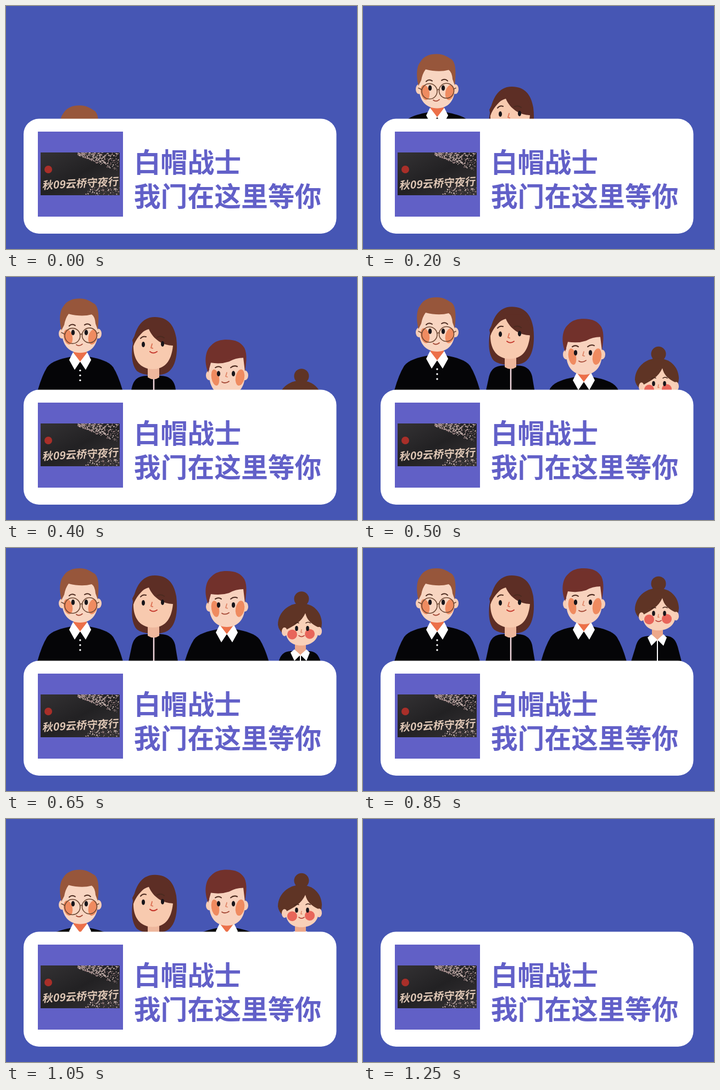
An HTML page that plays this animation: 639x443 px, repeating every 1500 ms.

```html
<!DOCTYPE html>
<html lang="zh-CN">
<head>
<meta charset="utf-8">
<title>白帽战士</title>
<style>
  html, body { margin: 0; width: 100%; height: 100%; overflow: hidden; background: #4656b4; }
  svg { display: block; width: 639px; height: 443px; }
  text { font-family: "Noto Sans CJK SC", "Noto Sans CJK", sans-serif; font-weight: 700; }
  .slogan { font-size: 48.8px; fill: #6260c8; }
  .line { fill: none; stroke-linecap: round; stroke-linejoin: round; }
</style>
</head>
<body>
<svg viewBox="0 0 639 443">
  <defs>
    <clipPath id="above"><rect width="639" height="206"/></clipPath>
    <clipPath id="pic"><rect x="63" y="267" width="144" height="78"/></clipPath>
    <linearGradient id="slate" x2="1" y2="1">
      <stop stop-color="#343234"/><stop offset=".5" stop-color="#222123"/><stop offset="1" stop-color="#373436"/>
    </linearGradient>
    <g id="suit">
      <path d="M119 143C100 147 83 151 75 162Q65 178 57 207V240H213V207Q205 178 195 162C187 151 170 147 151 143Z" fill="#050507"/>
      <path d="M123 128H147V145L135 153L123 145Z" fill="#ec7049"/>
      <path d="M122 135L115 149L125 167L135 152ZM148 135L155 149L145 167L135 152Z" fill="#fff"/>
    </g>
  </defs>

  <rect width="639" height="443" fill="#4656b4"/>

  <g clip-path="url(#above)">
    <g class="person">
      <use href="#suit"/>
      <g fill="#fff"><circle cx="135" cy="168" r="1.7"/><circle cx="135" cy="177" r="1.7"/><circle cx="135" cy="186" r="1.7"/></g>
      <g fill="#f7cdb6"><ellipse cx="102" cy="101" rx="6" ry="9"/><ellipse cx="168" cy="101" rx="6" ry="9"/></g>
      <path d="M102 58H167V100C167 122 155 136 135 136C114 136 102 121 102 98Z" fill="#f8d5c1"/>
      <g fill="#ef8b60"><ellipse cx="113" cy="107" rx="8" ry="14" transform="rotate(-12 113 107)"/><ellipse cx="158" cy="107" rx="8" ry="14" transform="rotate(12 158 107)"/></g>
      <path d="M101 95C96 75 98 59 104 52C110 41 121 37 134 37C148 37 154 43 160 46C169 51 170 70 167 94L163 83Q162 70 156 66Q138 71 114 65Q108 73 106 85Z" fill="#97563b"/>
      <g class="line" stroke="#4c2b20" stroke-width="2"><path d="M115 87Q120 82 126 86"/><path d="M143 85Q149 81 154 86"/></g>
      <g fill="#17151a"><ellipse cx="122" cy="99" rx="3.2" ry="5"/><ellipse cx="146" cy="99" rx="3.2" ry="5"/></g>
      <g class="line" stroke="#6e4935" stroke-width="1.6">
        <circle cx="121" cy="105" r="14"/><circle cx="152" cy="104" r="13.5"/>
        <path d="M135 103Q137 100 139 103M107 102L101 99M165 101L169 99"/>
      </g>
      <path class="line" d="M128 121Q133 125 139 120" stroke="#a44835" stroke-width="1.8"/>
    </g>

    <g class="person">
      <path d="M259 157C242 157 233 162 229 179L223 207V240H313V207L308 177C304 162 295 157 278 157Z" fill="#050507"/>
      <path d="M271 50C249 50 238 67 233 88C227 112 228 137 238 148C249 158 286 160 298 148C310 137 313 113 310 88C306 64 294 50 271 50Z" fill="#5d2e25"/>
      <path d="M258 140H279V160Q269 167 258 160Z" fill="#eeb79d"/>
      <path d="M260 72C245 77 232 88 232 101C231 126 243 145 267 145C288 145 301 132 304 102C286 102 268 91 260 72Z" fill="#f8caaf"/>
      <path d="M263 66C249 76 237 88 232 103L230 92L244 65ZM258 64C265 82 283 96 306 103L309 90L292 64Z" fill="#5d2e25"/>
      <g class="line" stroke="#4c2b20" stroke-width="2"><path d="M245 89Q249 84 255 86"/><path d="M275 87Q282 83 288 88"/></g>
      <g fill="#17151a"><ellipse cx="250" cy="100" rx="3" ry="5"/><ellipse cx="285" cy="99" rx="3" ry="5"/></g>
      <path class="line" d="M266 99L264 106L267 107" stroke="#de7659" stroke-width="2"/>
      <path class="line" d="M262 113Q268 118 275 113" stroke="#c5392e" stroke-width="2"/>
      <path d="M269 163V210" stroke="#f4d9df" stroke-width="2.5"/>
    </g>

    <g class="person">
      <use href="#suit" x="267"/>
      <g fill="#f7cdb6"><ellipse cx="370" cy="102" rx="6" ry="9"/><ellipse cx="435" cy="102" rx="6" ry="9"/></g>
      <path d="M370 64H435V101C435 125 422 139 402 139C382 139 370 124 370 101Z" fill="#f8d2be"/>
      <g fill="#ef8b60"><ellipse cx="381" cy="106" rx="7" ry="15" transform="rotate(-10 381 106)"/><ellipse cx="426" cy="106" rx="8" ry="15" transform="rotate(10 426 106)"/></g>
      <path d="M368 97C360 76 363 57 373 48C381 39 391 37 402 37C418 37 428 42 434 52C440 64 437 82 435 95L432 70Q418 70 406 77Q391 82 373 79Z" fill="#72312b"/>
      <g class="line" stroke="#4c2b20" stroke-width="2"><path d="M381 88Q387 84 392 88"/><path d="M409 88Q415 83 421 86"/></g>
      <g fill="#17151a"><ellipse cx="387" cy="99" rx="3.1" ry="5"/><ellipse cx="414" cy="99" rx="3.1" ry="5"/></g>
      <path class="line" d="M402 97L400 104L403 105" stroke="#df8668" stroke-width="1.8"/>
      <path class="line" d="M393 114Q399 118 406 113" stroke="#a44835" stroke-width="1.8"/>
    </g>

    <g class="person">
      <path d="M522 160C506 160 500 166 496 181L488 207V240H580V207L573 180C569 167 564 160 549 160Z" fill="#050507"/>
      <circle cx="538" cy="65" r="13.5" fill="#5f3425"/>
      <path d="M536 73C512 73 495 92 495 112Q496 122 506 130H567Q575 122 575 109C574 88 559 73 536 73Z" fill="#5f3425"/>
      <g fill="#f7cdb6"><ellipse cx="507" cy="125" rx="5" ry="8"/><ellipse cx="570" cy="124" rx="5" ry="8"/></g>
      <path d="M526 143H546V163L536 170L526 163Z" fill="#eda88a"/>
      <path d="M545 91C538 107 524 114 509 122V124C510 141 521 150 537 150C556 150 568 140 569 124V117C556 111 548 104 545 91Z" fill="#f9d0b8"/>
      <g fill="#e8655a"><circle cx="521" cy="130" r="9"/><circle cx="553" cy="129" r="9"/></g>
      <g class="line" stroke="#4c2b20" stroke-width="1.6"><path d="M525 110Q529 107 533 109"/><path d="M546 109Q550 106 554 109"/></g>
      <g fill="#17151a"><ellipse cx="529" cy="119" rx="2.8" ry="4.6"/><ellipse cx="549" cy="119" rx="2.8" ry="4.6"/></g>
      <path class="line" d="M538 121L537 126L539 126" stroke="#df8668" stroke-width="1.6"/>
      <path class="line" d="M533 132Q538 136 543 132" stroke="#b8443a" stroke-width="1.7"/>
      <path d="M525 157L518 163L525 178L536 167ZM547 157L553 163L547 178L536 167Z" fill="#fff"/>
      <path d="M536 168V210" stroke="#fff" stroke-width="2"/>
    </g>
  </g>

  <rect x="32" y="205.5" width="569.5" height="209.5" rx="28" fill="#fff"/>
  <rect x="58" y="229" width="155" height="155" fill="#6160c6"/>
  <g clip-path="url(#pic)">
    <rect x="63" y="267" width="144" height="78" fill="url(#slate)"/>
    <g id="dust"></g>
    <circle cx="77" cy="298" r="7" fill="#a92f29"/>
    <text transform="translate(66 334) rotate(-3) skewX(-10)" font-size="19.3" fill="#e0c8b6">秋09云桥守夜行</text>
  </g>
  <text class="slogan" x="232.8" y="302.8">白帽战士</text>
  <text class="slogan" x="232.8" y="364.5">我门在这里等你</text>
</svg>
<script>
  const LOOP = 1500, STEP = 50;
  const people = [...document.querySelectorAll(".person")];
  // drop: hidden depth; rise and fall: [start, duration]
  const moves = [
    { drop: 172, rise: [-52, 505], fall: [850, 380] },
    { drop: 160, rise: [70, 504], fall: [850, 380] },
    { drop: 172, rise: [205, 525], fall: [850, 380] },
    { drop: 157, rise: [305, 560], fall: [865, 365] }
  ];

  const part = (t, [start, length]) => Math.min(1, Math.max(0, (t - start) / length)) * Math.PI / 2;

  function offset(t, { drop, rise, fall }) {
    const up = 1 - Math.sin(part(t, rise));
    const down = 1 - Math.cos(part(t, fall));
    return drop * (up + down);
  }

  function scatterDust() {
    let seed = 11;
    const random = () => (seed = seed * 16807 % 2147483647) / 2147483647;
    const tones = ["#c9b2ae", "#a58c8b", "#e2cdc6", "#80696b"];
    let dots = "";
    for (let i = 0; i < 420; i++) {
      const low = i > 340;
      const x = low ? 145 + random() * 62 : 207 - 76 * random() ** 0.8;
      const y = low ? 330 + random() * 15 : 267 + (x - 120) * 0.42 * random();
      dots += `<circle cx="${x.toFixed(1)}" cy="${y.toFixed(1)}" r="${(0.4 + random() * 0.8).toFixed(1)}" fill="${tones[i % 4]}"/>`;
    }
    document.getElementById("dust").innerHTML = dots;
  }

  function draw() {
    const t = Math.floor(performance.now() % LOOP / STEP) * STEP;
    people.forEach((el, i) => el.setAttribute("transform", `translate(0 ${offset(t, moves[i]).toFixed(2)})`));
    requestAnimationFrame(draw);
  }

  scatterDust();
  draw();
</script>
</body>
</html>
```
